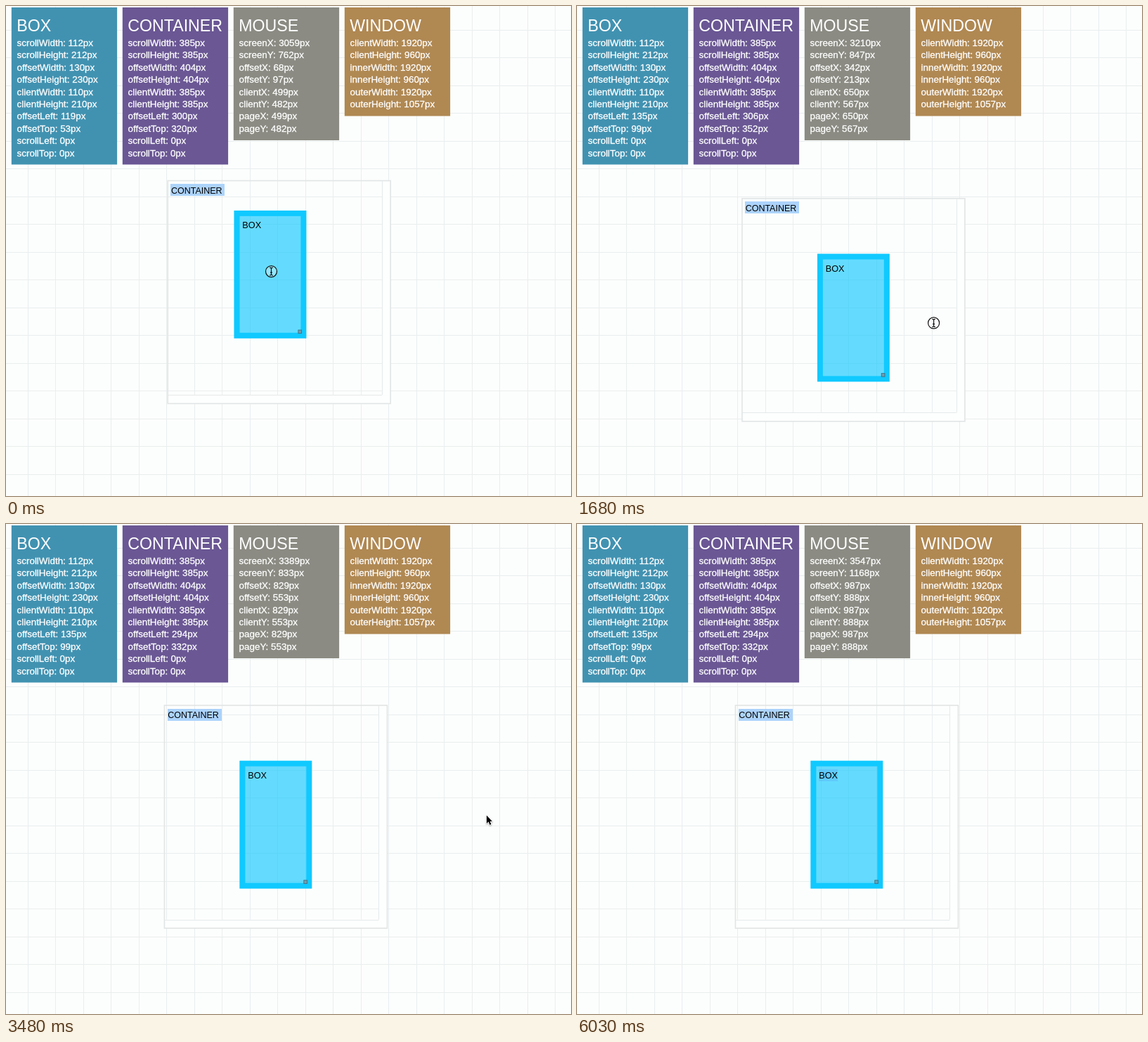
Write an HTML page with a canvas that moves like this. It is 804 px wide and 697 px high and loops after 6180 ms.

```html
<!DOCTYPE html>
<html lang="en">
<head>
<meta charset="utf-8">
<title>Element metrics</title>
<style>
  html, body { margin: 0; width: 100%; height: 100%; overflow: hidden; background: #fcfefd; }
  canvas { display: block; }
</style>
</head>
<body>
<canvas id="stage" width="804" height="697"></canvas>
<script>
const ctx = document.getElementById('stage').getContext('2d');
const LOOP = 6180, STEP = 150, SCALE = 0.79;
const BOX_DROP = 6, GRAB = 9, RELEASE = 21, LABEL_SELECTED = 34, EXIT = 40;
const POINTER_LEAD = 0.5;

// Turning points of the pointer in page pixels.
const keys = [
  { n: 0, p: [499, 482] },
  { n: 2, p: [458, 490] },
  { n: 4, p: [465, 537] },
  { n: BOX_DROP, p: [515, 528] },
  { n: GRAB, p: [644, 535] },
  { n: 11, p: [650, 567] },
  { n: 14, p: [662, 621] },
  { n: 15, p: [719, 623] },
  { n: 17, p: [752, 585] },
  { n: RELEASE, p: [638, 547] },
  { n: 23, p: [829, 553] },
  { n: 24, p: [900, 505] },
  { n: 27, p: [690, 462] },
  { n: 32, p: [200, 590] },
  { n: 33, p: [331, 651] },
  { n: 34, p: [495, 735] },
  { n: 36, p: [850, 780] },
  { n: EXIT, p: [987, 888] }
];

const clamp = (v, lo, hi) => Math.max(lo, Math.min(hi, v));
const toStage = ([x, y]) => [x * SCALE - 7.1, y * SCALE - 4.6];

function slope(k, axis) {
  const rate = i => (keys[i + 1].p[axis] - keys[i].p[axis]) / (keys[i + 1].n - keys[i].n);
  if (k === 0) return rate(0);
  if (k === keys.length - 1) return rate(k - 1);
  const a = rate(k - 1), b = rate(k);
  return a * b > 0 ? 2 * a * b / (a + b) : 0;
}

// Monotone cubic curve through the turning points.
function mouseAt(n) {
  n = clamp(n, 0, EXIT);
  const k = Math.max(1, keys.findIndex(key => key.n >= n));
  const a = keys[k - 1], b = keys[k];
  const span = b.n - a.n, s = (n - a.n) / span, r = 1 - s;
  return [0, 1].map(i =>
    a.p[i] * r * r * (1 + 2 * s) + b.p[i] * s * s * (1 + 2 * r) +
    span * s * r * (slope(k - 1, i) * r - slope(k, i) * s));
}

const pixelAt = n => mouseAt(n).map(Math.round);

function stateAt(n) {
  const mouse = pixelAt(n);
  const boxDrag = pixelAt(Math.min(n, BOX_DROP));
  const holderDrag = pixelAt(clamp(n, GRAB, RELEASE));
  const box = [boxDrag[0] - 380, boxDrag[1] - 429];
  const holder = [holderDrag[0] - 344, holderDrag[1] - 215];
  const dragging = n < BOX_DROP || (n >= GRAB && n < RELEASE);
  const inside = (p, w, h) => p[0] >= 0 && p[1] >= 0 && p[0] < w && p[1] < h;
  const inHolder = mouse.map((v, i) => v - holder[i] - 2);
  const inBox = inHolder.map((v, i) => v - box[i] - 10);

  let offset = mouse;
  if (inside(inBox, 120, 220)) offset = inBox;
  else if (inside(inHolder, 402, 402)) offset = inHolder;
  return { mouse, box, holder, dragging, offset };
}

function rect(x, y, w, h, color) {
  ctx.fillStyle = color;
  ctx.fillRect(x, y, w, h);
}

function text(str, x, y, size, color, weight = 0) {
  ctx.font = `${size}px "Liberation Sans", Arial, sans-serif`;
  ctx.fillStyle = ctx.strokeStyle = color;
  ctx.fillText(str, x, y);
  if (weight) {
    ctx.lineWidth = weight;
    ctx.strokeText(str, x, y);
  }
}

function drawGrid() {
  rect(0, 0, 804, 697, '#fcfefd');
  for (let x = 31; x < 804; x += 39.5) rect(Math.floor(x), 0, 1, 697, '#eaeeee');
  for (let y = 34; y < 697; y += 39.5) rect(0, Math.floor(y), 804, 1, '#eaeeee');
}

function drawPanel(column, color, title, rows) {
  const x = 7.8 + column * 158, entries = Object.entries(rows);
  rect(x, 2, 150.3, 51 + entries.length * 17.25, color);
  text(title, x + 7.4, 35.5, 23.2, '#fff');
  entries.forEach(([key, value], i) =>
    text(`${key}: ${value}px`, x + 7.8, 57 + i * 17.4, 13.4, '#fff', 0.3));
}

const metrics = (scroll, offset, client, [left, top]) => ({
  scrollWidth: scroll[0], scrollHeight: scroll[1],
  offsetWidth: offset[0], offsetHeight: offset[1],
  clientWidth: client[0], clientHeight: client[1],
  offsetLeft: left, offsetTop: top, scrollLeft: 0, scrollTop: 0
});

function drawPanels({ mouse: [x, y], offset, box, holder }) {
  drawPanel(0, '#4192b1', 'BOX', metrics([112, 212], [130, 230], [110, 210], box));
  drawPanel(1, '#6a5794', 'CONTAINER', metrics([385, 385], [404, 404], [385, 385], holder));
  drawPanel(2, '#8b8b83', 'MOUSE', {
    screenX: x + 2560, screenY: y + 280, offsetX: offset[0], offsetY: offset[1],
    clientX: x, clientY: y, pageX: x, pageY: y
  });
  drawPanel(3, '#b08852', 'WINDOW', {
    clientWidth: 1920, clientHeight: 960, innerWidth: 1920, innerHeight: 960,
    outerWidth: 1920, outerHeight: 1057
  });
}

function drawHolder(x, y) {
  rect(x + 305, y + 1, 12, 316, '#fdfefe');
  rect(x + 1, y + 305, 316, 12, '#fdfefe');
  rect(Math.round(x + 305), y + 1, 1, 304, '#e6eaea');
  rect(x + 1, Math.round(y + 305), 304, 1, '#e6eaea');
  ctx.strokeStyle = '#e2e5e5';
  ctx.lineWidth = 1.6;
  ctx.strokeRect(x + 0.3, y + 0.3, 317, 317);
  rect(Math.round(x + 4.5), Math.round(y + 5), 77, 17, '#acd3fb');
  text('CONTAINER', x + 5, y + 18.3, 12.5, '#000');
}

function drawBox(x, y, selected) {
  const w = 102.7, h = 181.7, edge = 7.9;
  rect(x, y, w, h, 'rgba(0, 197, 255, 0.6)');
  ctx.strokeStyle = '#10c9ff';
  ctx.lineWidth = edge;
  ctx.strokeRect(x + edge / 2, y + edge / 2, w - edge, h - edge);
  if (selected) rect(x + 11.5, y + 12, 27, 17, 'rgba(90, 170, 250, 0.35)');
  text('BOX', x + 11.7, y + 25.2, 12.7, '#000');
  rect(x + 90.8, y + 169.5, 5.6, 5.6, '#41758a');
  rect(x + 91.8, y + 170.5, 3.6, 3.6, '#6f9fb2');
}

function drawBeam(x, y) {
  ctx.beginPath();
  ctx.arc(x, y, 8, 0, Math.PI * 2);
  ctx.fillStyle = 'rgba(255, 255, 255, 0.3)';
  ctx.fill();
  ctx.strokeStyle = '#111';
  ctx.lineWidth = 1.2;
  ctx.stroke();
  ctx.beginPath();
  for (const side of [-1, 1]) {
    ctx.moveTo(x + side * 2.3, y - 5.5);
    ctx.quadraticCurveTo(x, y - 5.5, x, y - 4);
    ctx.lineTo(x, y + 4);
    ctx.quadraticCurveTo(x, y + 5.5, x + side * 2.3, y + 5.5);
  }
  ctx.moveTo(x - 1.5, y + 1.5);
  ctx.lineTo(x + 1.5, y + 1.5);
  ctx.stroke();
}

function drawArrow(x, y) {
  const outline = [[0, 0], [0, 11.5], [2.7, 9], [4.6, 13.4], [6.5, 12.6], [4.7, 8.4], [8, 8.4]];
  ctx.save();
  ctx.translate(x, y - 1);
  ctx.beginPath();
  outline.forEach(([px, py]) => ctx.lineTo(px, py));
  ctx.closePath();
  ctx.shadowColor = 'rgba(0, 0, 0, 0.35)';
  ctx.shadowBlur = 2;
  ctx.shadowOffsetY = 1;
  ctx.strokeStyle = '#fff';
  ctx.lineWidth = 1.6;
  ctx.lineJoin = 'round';
  ctx.stroke();
  ctx.shadowColor = 'transparent';
  ctx.fillStyle = '#000';
  ctx.fill();
  ctx.restore();
}

// The third step lasts 30 ms longer than the others.
const stepAt = t => t < 480 ? Math.min(2, Math.floor(t / STEP)) : Math.floor((t - 30) / STEP);

function draw(t) {
  const n = stepAt(t), state = stateAt(n);
  const [x, y] = toStage(state.holder);
  const [boxX, boxY] = state.box;
  const drawPointer = state.dragging ? drawBeam : drawArrow;
  drawGrid();
  drawPanels(state);
  drawHolder(x, y);
  drawBox(x + boxX * SCALE + 0.7, y + boxY * SCALE + 0.9, n >= LABEL_SELECTED);
  if (n < EXIT) drawPointer(...toStage(mouseAt(n + POINTER_LEAD)));
}

const start = performance.now();
function tick() {
  draw((performance.now() - start) % LOOP);
  requestAnimationFrame(tick);
}
tick();
</script>
</body>
</html>
```
